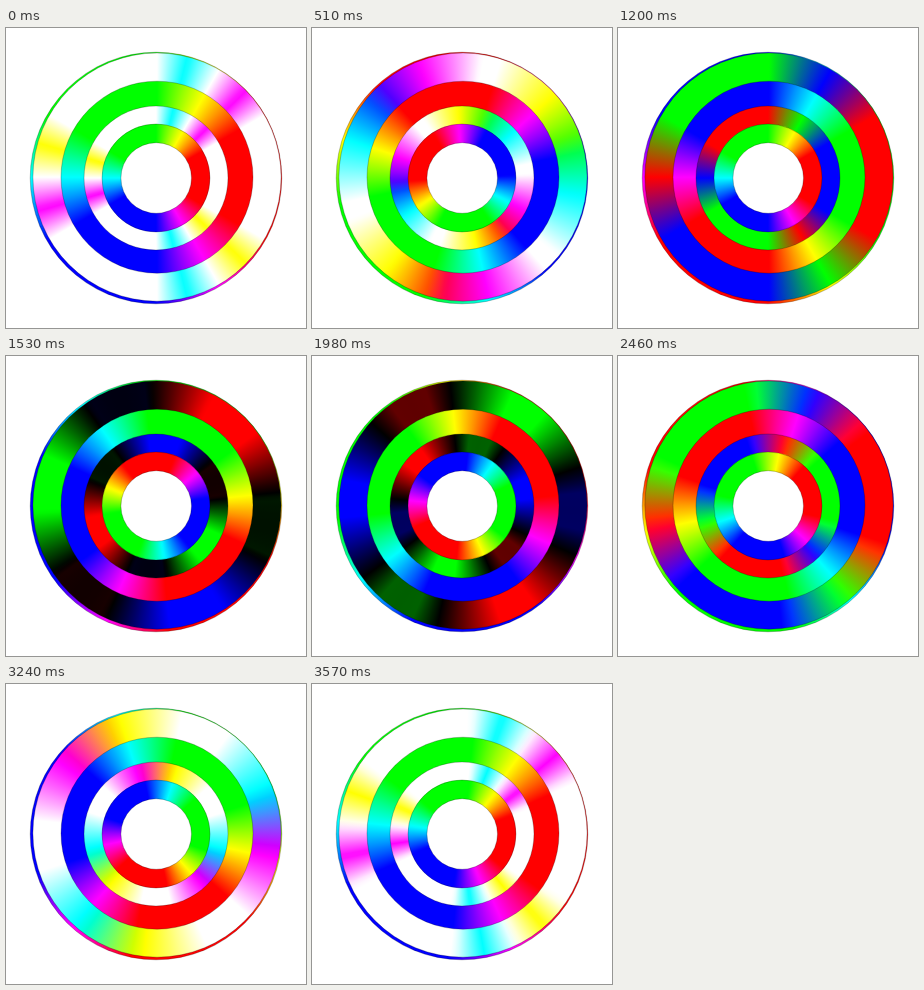
Animation, 300 px wide and 300 px high, one loop 3600 ms. Source, as an HTML page with a canvas:

```html
<!DOCTYPE html>
<html lang="en">
<head>
<meta charset="utf-8">
<title>Colour rings</title>
<style>
  html, body { margin: 0; height: 100%; overflow: hidden; background: #fff; }
  canvas { display: block; width: 300px; height: 300px; }
</style>
</head>
<body>
<canvas id="stage" width="300" height="300"></canvas>
<script>
const ctx = document.getElementById('stage').getContext('2d');
const TAU = 2 * Math.PI, LOOP = 3600, STEP = 30, STOPS = 180;

// Hard-limited cosine, from 0 to 1: full within 60 degrees, off beyond 90.
const wave = a => Math.min(1, Math.max(0, 2 * Math.cos(a)));

// A turned wheel, and the difference of one wheel and another inverted one.
const wheel = turn => a => wave(a - turn);
const blend = (p, q) => a => Math.abs(wave(a - p) + wave(a - q) - 1);

function conic(x, y, level) {
  const gradient = ctx.createConicGradient(0, x, y);
  for (let i = 0; i <= STOPS; i++) {
    const rgb = [0, 1, 2].map(k => Math.round(255 * level(-TAU * (i / STOPS + k / 3))));
    gradient.addColorStop(i / STOPS, `rgb(${rgb})`);
  }
  return gradient;
}

function disc(x, y, radius, fill) {
  ctx.beginPath();
  ctx.arc(x, y, radius, 0, TAU);
  ctx.fillStyle = fill;
  ctx.fill();
  ctx.stroke();
}

function draw(time) {
  const turn = TAU * Math.floor(time % LOOP / STEP) * STEP / LOOP;
  const ring = (x, y, radius, level) => disc(x, y, radius, conic(x, y, level));
  ctx.fillStyle = '#fff';
  ctx.fillRect(0, 0, 300, 300);
  ctx.lineWidth = 0.6;
  ctx.strokeStyle = 'rgba(0, 0, 0, 0.4)';
  ring(150, 150, 125.8, wheel(2 * turn));
  ring(151, 149.1, 124.1, blend(turn, 2 * turn));
  ring(151, 149.2, 96, wheel(2 * turn));
  ring(150, 150, 72, blend(2 * turn, 3 * turn));
  ring(150, 150, 54, wheel(3 * turn));
  disc(150.2, 150, 35.3, '#fff');
}

const start = performance.now();
function tick() {
  draw(performance.now() - start);
  requestAnimationFrame(tick);
}
tick();
</script>
</body>
</html>
```
